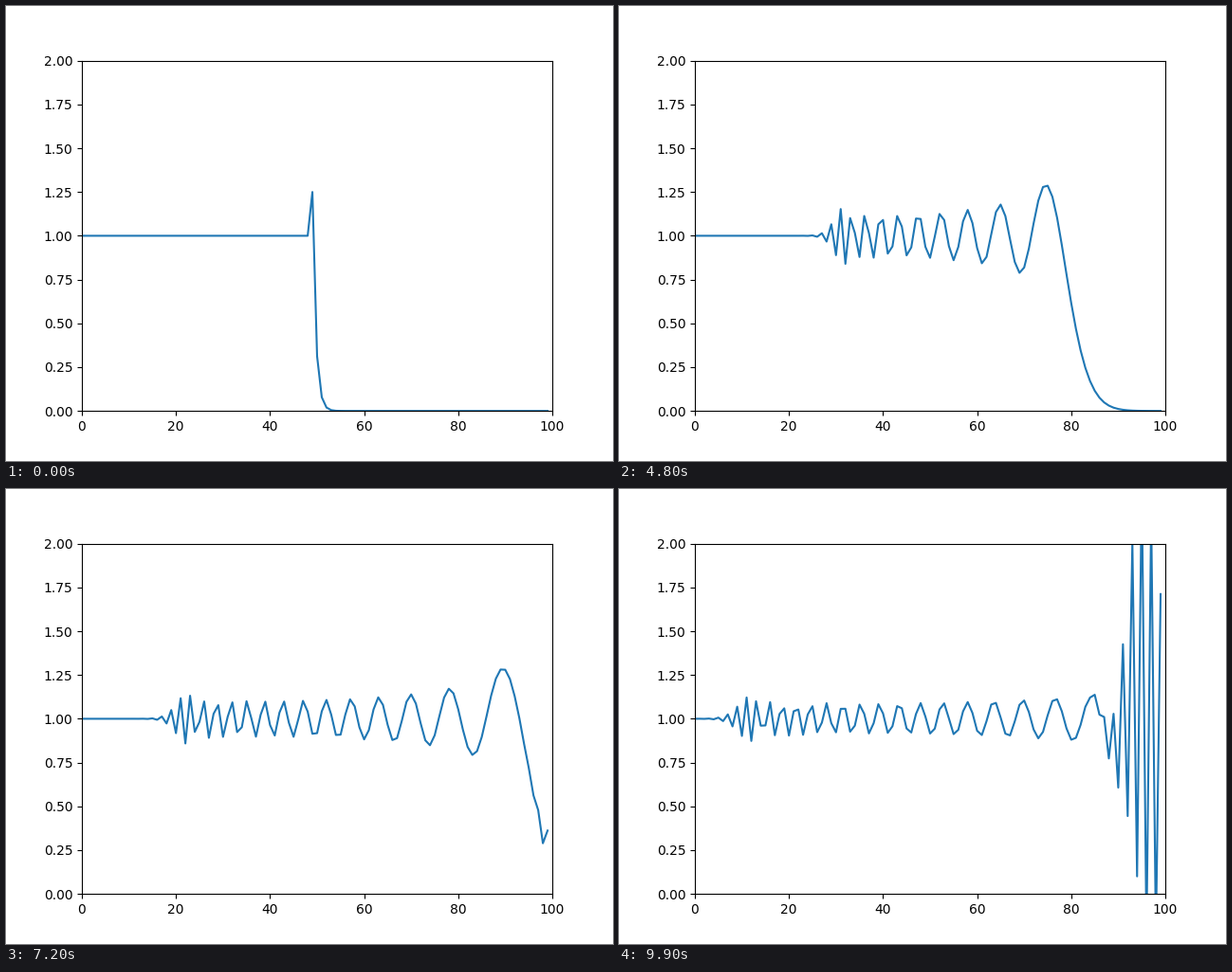
Animation of 640x480 px, one loop 10000 ms. Source, as a matplotlib script:

```python
import numpy as np
import matplotlib.pyplot as plt
from matplotlib.animation import FuncAnimation

CELLS = 100
FRAMES = 100
COURANT = 0.5


def advance(u):
    """One in-place sweep of the centred advection scheme."""
    for j in range(1, CELLS):
        u[j] += COURANT / 2 * (u[j - 1] - u[j + 1])


def solve():
    # One extra cell, held at zero, closes the right end.
    u = np.where(np.arange(CELLS + 1) < CELLS // 2, 1.0, 0.0)
    history = []
    for _ in range(FRAMES):
        advance(u)
        history.append(u[:CELLS].copy())
    return history


history = solve()

fig, ax = plt.subplots(figsize=(6.4, 4.8), dpi=100)
ax.set_xlim(0, 100)
ax.set_ylim(0, 2)
line, = ax.plot(np.arange(CELLS), history[0])


def update(i):
    line.set_ydata(history[i])
    return line,


def init():
    return update(0)


anim = FuncAnimation(fig, update, frames=FRAMES, init_func=init,
                     interval=100, repeat=True, repeat_delay=0)

plt.show()
```
